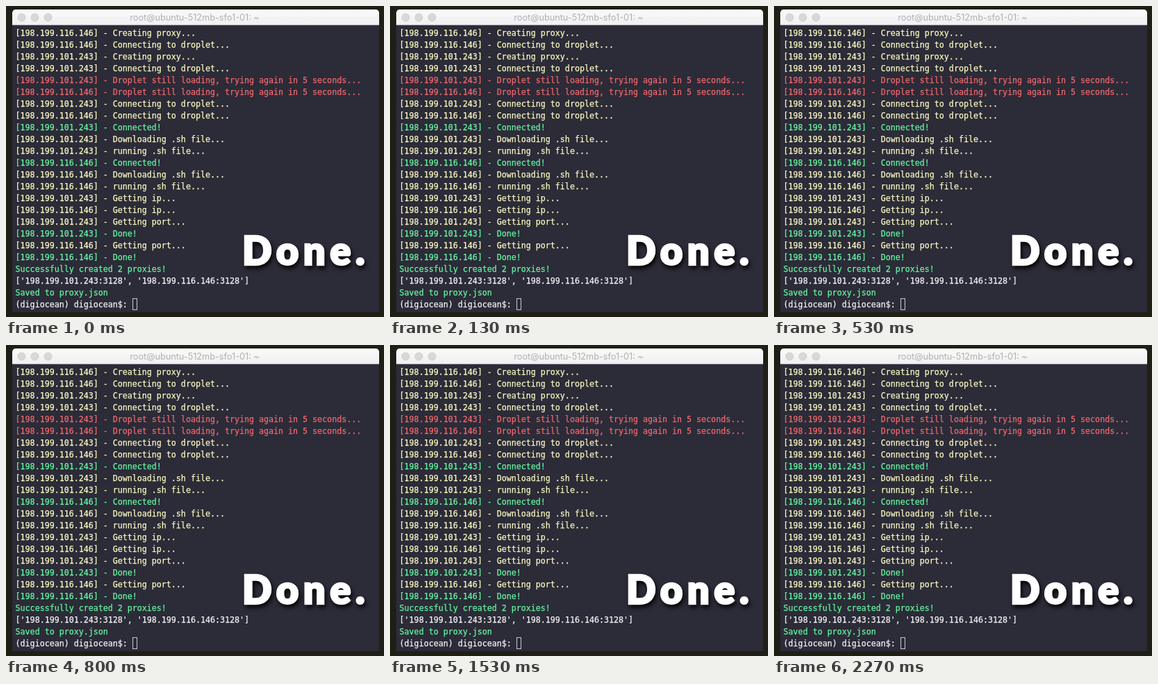
An HTML page that plays this animation: 544 by 448 pixels, repeating every 2340 ms.

```html
<!DOCTYPE html>
<html lang="en">
<head>
<meta charset="utf-8">
<title>Terminal</title>
<style>
  html, body { margin: 0; width: 100%; height: 100%; overflow: hidden; background: #1f1f16; }
  svg { display: block; width: 544px; height: 448px; }
  .log { font: 11.65px "DejaVu Sans Mono", monospace; white-space: pre; stroke-width: .25; }
  .bar { font: 12.7px Inter, sans-serif; fill: #b2b0b2; text-anchor: middle; }
  .done { font: 900 56px Lato, sans-serif; letter-spacing: 6.5px;
          fill: #fff; stroke: #fff; stroke-width: 2.5;
          filter: drop-shadow(2px 4px 3px rgba(0, 0, 0, .9)); }
</style>
</head>
<body>
<svg viewBox="0 0 544 448">
  <defs>
    <linearGradient id="chrome" x2="0" y2="1">
      <stop stop-color="#fafafa"/>
      <stop offset="1" stop-color="#f0eff1"/>
    </linearGradient>
  </defs>
  <rect x="9" y="20" width="528" height="421" fill="#2c2b38"/>
  <path d="M9 27.5V10a5 5 0 0 1 5-5H532a5 5 0 0 1 5 5V27.5Z" fill="url(#chrome)"/>
  <g fill="#d9d8d9" stroke="#cfcecf">
    <circle cx="22.5" cy="16.5" r="5.5"/>
    <circle cx="41.5" cy="16.5" r="5.5"/>
    <circle cx="60.5" cy="16.5" r="5.5"/>
  </g>
  <text class="bar" x="271.5" y="21">root@ubuntu-512mb-sfo1-01: ~</text>
  <g class="log" id="log"></g>
  <rect x="182.5" y="421.5" width="6" height="16" fill="none" stroke="#c9c9cc"/>
  <text class="done" x="340" y="373">Done.</text>
</svg>
<script>
  const colors = { y: '#fafac0', r: '#f0686c', g: '#66f7a2', w: '#f4f4f6' };
  const A = '198.199.116.146', B = '198.199.101.243';
  const step = (ip, text, color = 'y') => [`[${ip}] - ${text}`, color];
  const retry = 'Droplet still loading, trying again in 5 seconds...';

  const lines = [
    step(A, 'Creating proxy...'),
    step(A, 'Connecting to droplet...'),
    step(B, 'Creating proxy...'),
    step(B, 'Connecting to droplet...'),
    step(B, retry, 'r'),
    step(A, retry, 'r'),
    step(B, 'Connecting to droplet...'),
    step(A, 'Connecting to droplet...'),
    step(B, 'Connected!', 'g'),
    step(B, 'Downloading .sh file...'),
    step(B, 'running .sh file...'),
    step(A, 'Connected!', 'g'),
    step(A, 'Downloading .sh file...'),
    step(A, 'running .sh file...'),
    step(B, 'Getting ip...'),
    step(A, 'Getting ip...'),
    step(B, 'Getting port...'),
    step(B, 'Done!', 'g'),
    step(A, 'Getting port...'),
    step(A, 'Done!', 'g'),
    ['Successfully created 2 proxies!', 'g'],
    [`['${B}:3128', '${A}:3128']`, 'w'],
    ['Saved to proxy.json', 'g'],
    ['(digiocean) digiocean$: ', 'w'],
  ];

  // The session has finished, so the picture holds still for the whole loop.
  const log = document.getElementById('log');
  lines.forEach(([text, color], row) => {
    const el = document.createElementNS('http://www.w3.org/2000/svg', 'text');
    el.setAttribute('x', 13.6);
    el.setAttribute('y', 43 + row * 17);
    el.setAttribute('fill', colors[color]);
    el.setAttribute('stroke', colors[color]);
    el.textContent = text;
    log.append(el);
  });
</script>
</body>
</html>
```
